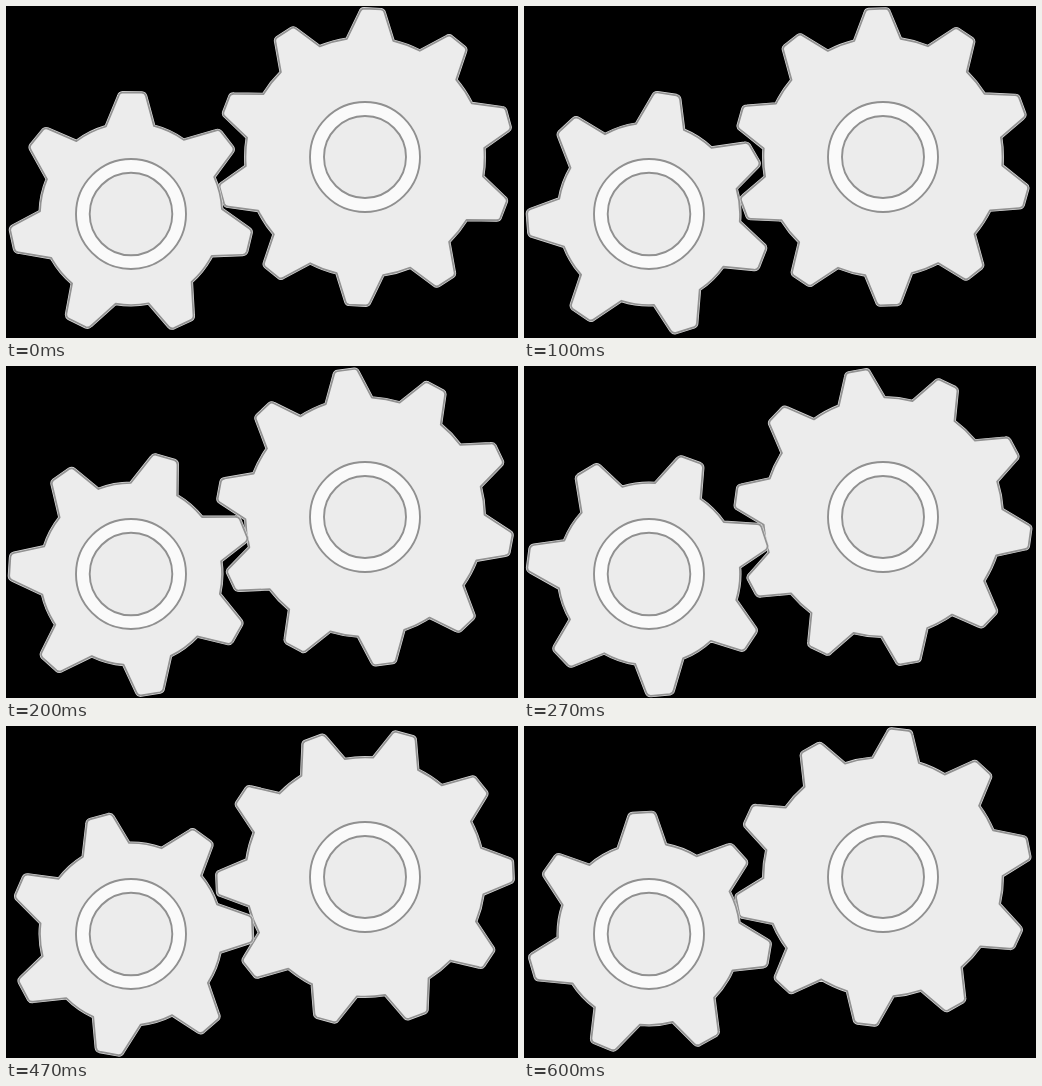
Animation of 512 by 332 pixels, one loop 670 ms. Source, as an HTML page:

```html
<!DOCTYPE html>
<html lang="en">
<head>
<meta charset="utf-8">
<title>Turning gears</title>
<style>
  @property --i { syntax: "<integer>"; inherits: true; initial-value: 0; }

  html, body { margin: 0; width: 100%; height: 100%; overflow: hidden; background: #000; }
  svg { display: block; width: 512px; height: 332px; animation: tick 670ms step-end infinite; }

  /* Thirteen poses, held for 70 and 30 ms in turn. */
  @keyframes tick {
    0% { --i: 0; }
    10.447% { --i: 1; }
    14.925% { --i: 2; }
    25.373% { --i: 3; }
    29.85% { --i: 4; }
    40.298% { --i: 5; }
    44.776% { --i: 6; }
    55.223% { --i: 7; }
    59.701% { --i: 8; }
    70.149% { --i: 9; }
    74.626% { --i: 10; }
    85.074% { --i: 11; }
    89.552% { --i: 12; }
    100% { --i: 13; }
  }

  .big { transform: rotate(calc(2.9deg - 2.6deg * var(--i) - .35deg * max(0, var(--i) - 9))); }
  .small { transform: rotate(calc(.6deg + 360deg / 91 * var(--i))); }

  .rim { fill: none; stroke: #dcdcdc; stroke-width: 3; stroke-linejoin: round; }
  .body { fill: #ececec; stroke: #929292; stroke-width: 1.7; stroke-linejoin: round; }
  .ring { fill: #fafafa; stroke: #909090; stroke-width: 1.9; }
  .hub { fill: #ececec; stroke: #909090; stroke-width: 1.9; }
</style>
</head>
<body>
<svg viewBox="0 0 512 332">
  <g transform="translate(359 151)">
    <g class="big"><path class="rim"/><path class="body"/></g>
    <circle class="ring" r="55"/>
    <circle class="hub" r="41"/>
  </g>
  <g transform="translate(125 208)">
    <g class="small"><path class="rim"/><path class="body"/></g>
    <circle class="ring" r="55"/>
    <circle class="hub" r="41.3"/>
  </g>
</svg>
<script>
  // Point at a clockwise angle in degrees from the top.
  const polar = (r, deg) => {
    const a = deg * Math.PI / 180;
    return `${(r * Math.sin(a)).toFixed(2)} ${(-r * Math.cos(a)).toFixed(2)}`;
  };

  // A tooth reaches "back" and "ahead" degrees from its middle at the base, "tip" at its rounded end.
  function gearPath({ teeth, rBase, rTip, back, ahead, tip }) {
    const arc = `A${rBase} ${rBase} 0 0 1 `;
    const rSide = rTip - 3;
    let d = "";
    for (let k = 0; k < teeth; k++) {
      const mid = k * 360 / teeth;
      const edge = s => polar(rTip, mid + s * tip);
      const side = s => polar(rSide, mid + s * tip * 1.1);
      d += (k ? arc : "M") + polar(rBase, mid - back);
      d += `L${side(-1)}Q${edge(-1)} ${edge(-.75)}`;
      d += `L${edge(.75)}Q${edge(1)} ${side(1)}`;
      d += `L${polar(rBase, mid + ahead)}`;
    }
    return d + arc + polar(rBase, -back) + "Z";
  }

  function shape(name, gear) {
    const d = gearPath(gear);
    document.querySelectorAll(`.${name} path`).forEach(p => p.setAttribute("d", d));
  }

  shape("big", { teeth: 10, rBase: 119.5, rTip: 148.4, back: 11.6, ahead: 10.8, tip: 4.4 });
  shape("small", { teeth: 7, rBase: 91, rTip: 121.8, back: 16.6, ahead: 14, tip: 6 });
</script>
</body>
</html>
```
